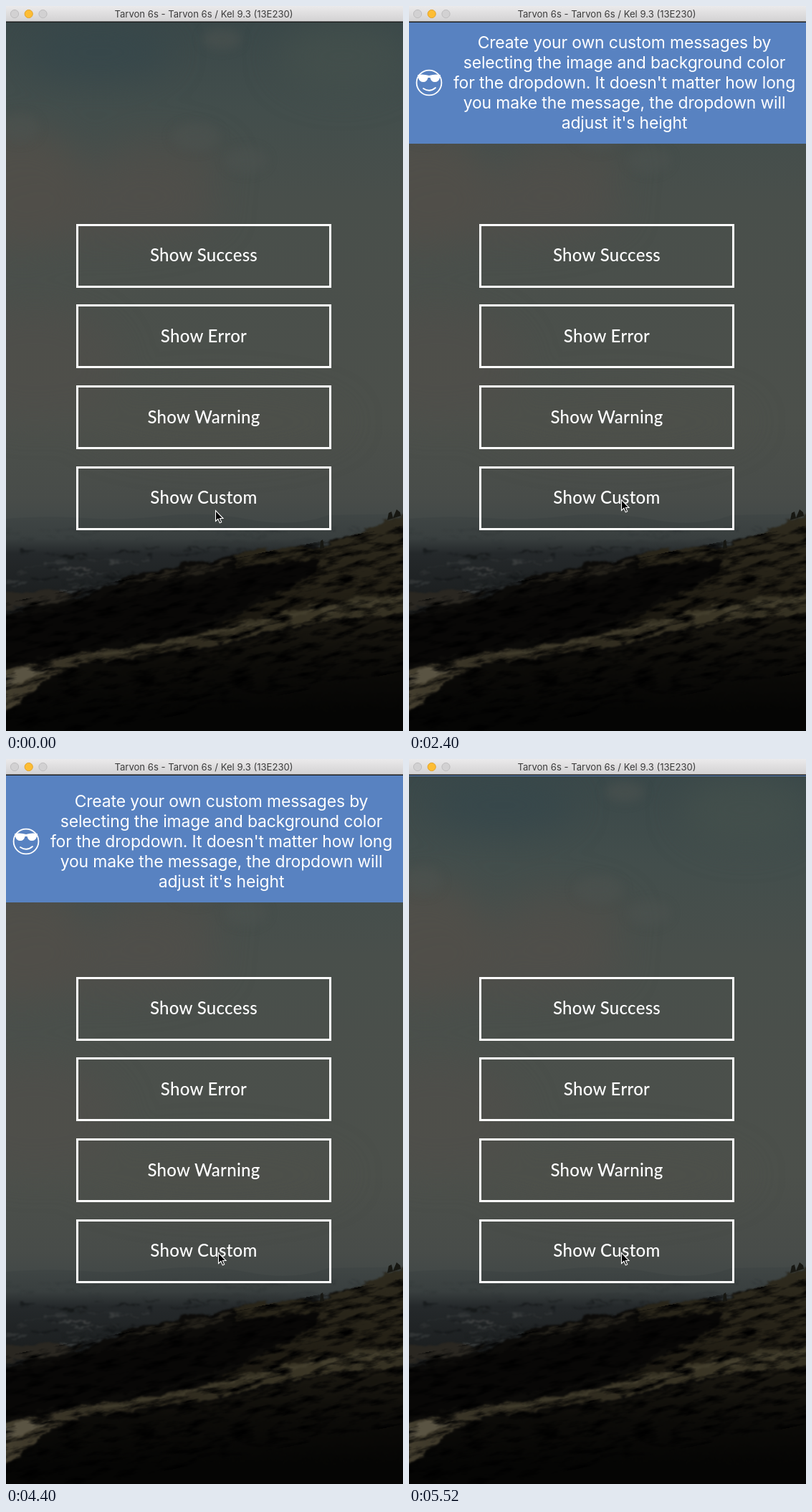
These frames come from a looping animation (554 px wide and 1011 px high, 5600 ms). An HTML page:

```html
<!DOCTYPE html>
<html lang="en">
<head>
<meta charset="utf-8">
<title>Dropdown alert</title>
<style>
  html, body { margin: 0; width: 100%; height: 100%; overflow: hidden; background: #050504; }
  svg { display: block; width: 100%; height: 100%; }
  text { text-anchor: middle; }
  filter { color-interpolation-filters: sRGB; }
  .label { font: 500 24px Lato, "Open Sans", sans-serif; letter-spacing: .3px; fill: #fff; }
  .message { font: 22.9px Inter, Roboto, sans-serif; letter-spacing: -.13px; fill: #fff; }
  .title { font: 13.1px Inter, Roboto, sans-serif; fill: #3c3c3c; }
</style>
</head>
<body>
<svg viewBox="0 0 554 1011">
  <defs>
    <linearGradient id="sky" x2="0" y2="1">
      <stop offset="0" stop-color="#3a4849"/>
      <stop offset=".18" stop-color="#434e4c"/>
      <stop offset=".36" stop-color="#494f4b"/>
      <stop offset=".8" stop-color="#4c504b"/>
      <stop offset=".95" stop-color="#484c49"/>
      <stop offset="1" stop-color="#424847"/>
    </linearGradient>
    <linearGradient id="plain" x2="0" y2="1">
      <stop offset="0" stop-color="#404645"/>
      <stop offset=".2" stop-color="#393f3f"/>
      <stop offset=".32" stop-color="#25292b"/>
      <stop offset=".65" stop-color="#1c1f20"/>
      <stop offset="1" stop-color="#151412"/>
    </linearGradient>
    <linearGradient id="slope" x2="0" y2="1">
      <stop offset="0" stop-color="#302c1f"/>
      <stop offset=".6" stop-color="#262217"/>
      <stop offset="1" stop-color="#18150e"/>
    </linearGradient>
    <linearGradient id="ridge" x1="0" x2="1">
      <stop offset="0" stop-color="#464030"/>
      <stop offset=".35" stop-color="#2b271c"/>
      <stop offset=".75" stop-color="#3b3626"/>
      <stop offset="1" stop-color="#332f21"/>
    </linearGradient>
    <linearGradient id="shade" x2="0" y2="1">
      <stop offset="0" stop-color="#1d1a12"/>
      <stop offset=".4" stop-color="#0c0b08"/>
      <stop offset=".75" stop-color="#050504"/>
    </linearGradient>
    <linearGradient id="bar" x2="0" y2="1">
      <stop offset="0" stop-color="#ebeaeb"/>
      <stop offset="1" stop-color="#d2d1d2"/>
    </linearGradient>
    <filter id="soft" x="-60%" y="-60%" width="220%" height="220%"><feGaussianBlur stdDeviation="24"/></filter>
    <filter id="blur" x="-30%" y="-30%" width="160%" height="160%"><feGaussianBlur stdDeviation="7"/></filter>
    <filter id="rough" x="-5%" y="-5%" width="110%" height="110%">
      <feTurbulence type="fractalNoise" baseFrequency=".05 .1" numOctaves="3" seed="4"/>
      <feDisplacementMap in="SourceGraphic" scale="14" xChannelSelector="R" yChannelSelector="G"/>
      <feGaussianBlur stdDeviation=".8"/>
    </filter>
    <filter id="mottle" x="0" y="0" width="100%" height="100%">
      <feTurbulence type="fractalNoise" baseFrequency=".03 .11" numOctaves="4" seed="9"/>
      <feColorMatrix values="0 0 0 0 0  0 0 0 0 0  0 0 0 0 0  2.6 0 0 0 -1.1"/>
    </filter>
    <clipPath id="screen"><rect y="23" width="554" height="988"/></clipPath>
  </defs>

  <g clip-path="url(#screen)">
    <rect y="22" width="554" height="700" fill="url(#sky)"/>
    <g filter="url(#soft)" fill="#524f4a">
      <ellipse cx="20" cy="255" rx="95" ry="85" opacity=".9"/>
      <ellipse cx="215" cy="225" rx="90" ry="42" opacity=".6"/>
      <ellipse cx="130" cy="285" rx="170" ry="45" opacity=".7"/>
      <ellipse cx="40" cy="500" rx="120" ry="80" opacity=".5"/>
      <ellipse cx="290" cy="580" rx="190" ry="50" opacity=".3"/>
      <ellipse cx="470" cy="70" rx="90" ry="50" fill="#46524e" opacity=".6"/>
      <ellipse cx="130" cy="65" rx="100" ry="40" fill="#35474b" opacity=".6"/>
    </g>
    <g filter="url(#blur)" fill="#4d5350" opacity=".55">
      <ellipse cx="301" cy="46" rx="28" ry="15"/>
      <ellipse cx="20" cy="170" rx="26" ry="20"/>
      <ellipse cx="265" cy="182" rx="34" ry="20"/>
      <ellipse cx="335" cy="215" rx="30" ry="18"/>
    </g>

    <path fill="url(#plain)" d="M0 715Q60 710 110 714T220 711T340 716T450 710L554 708V880H0Z"/>
    <g filter="url(#rough)">
      <g id="fields"></g>
      <path fill="#2a2721" d="M-20 819Q60 813 108 820L70 836L-20 840Z"/>
      <path fill="#0c0b09" d="M-20 852Q50 832 105 828Q140 802 190 792Q250 776 318 768Q340 754 390 757L445 752L500 730L574 702V1030H-20Z"/>
      <path fill="url(#slope)" d="M320 768Q345 753 390 757L440 755Q475 742 500 730L574 702V822Q430 832 290 868Q340 836 400 810Q440 790 436 774Q380 776 320 782Z"/>
      <path fill="#24211a" d="M150 810Q230 782 320 773Q290 791 230 798Q180 805 150 810Z"/>
      <path fill="#080706" d="M-20 866Q70 836 150 826Q260 812 340 784Q400 772 439 774Q435 796 370 819Q300 852 240 870Q120 894 -20 924Z"/>
      <path fill="url(#ridge)" d="M-20 931Q60 911 130 899Q230 886 310 864Q420 833 574 814V846Q430 855 340 880Q240 904 130 913Q70 923 42 951Q22 973 -20 996Z"/>
      <path fill="#5a5443" d="M-20 936Q30 922 62 922Q49 935 30 941Q10 949 -20 955Z"/>
      <path fill="none" stroke="#4c4634" stroke-width="4" opacity=".6" d="M120 906Q230 891 310 870Q420 840 574 824"/>
      <path fill="url(#shade)" d="M-20 998Q30 972 50 946Q80 922 150 914Q260 906 350 882Q440 858 574 845V1030H-20Z"/>
    </g>
    <rect x="-120" y="780" width="760" height="200" transform="rotate(-11 277 880)" filter="url(#mottle)"/>
    <path fill="#171712" d="M438 757L439 746L442 744L444 756ZM532 717L534 707L538 705L540 714L545 702L550 706L551 711Z"/>
    <g id="buttons"></g>

    <g id="banner">
      <rect y="-300" width="554" height="300" fill="#5882c1"/>
      <g id="message"></g>
      <g transform="translate(28 -85)" fill="none" stroke="#fff" stroke-width="1.8">
        <circle r="17.4"/>
        <path d="M-8 8Q1 14 9 7" stroke-linecap="round"/>
        <path fill="#fff" stroke="none" d="M-16-11Q-8-12.500 0-10Q8-12.500 16-11L15-7Q13.500-1 8-1Q3-1 1.500-7H-1.500Q-3-1-8-1Q-13.500-1-15-7Z"/>
      </g>
    </g>
    <path id="cursor" d="M0 0V15L3.400 11.800L5.800 17.300L8.200 16.300L5.900 11H10.500Z" fill="#000" stroke="#fff" stroke-width="1.100"/>
  </g>

  <rect width="554" height="22" fill="url(#bar)"/>
  <rect y="21.500" width="554" height="1.500" fill="#191b1b"/>
  <g stroke-width="1">
    <circle cx="12" cy="11" r="5.600" fill="#d2d1d2" stroke="#bebdbe"/>
    <circle cx="31.700" cy="11" r="5.600" fill="#fdbd33" stroke="#e2a32c"/>
    <circle cx="51.500" cy="11" r="5.600" fill="#d2d1d2" stroke="#bebdbe"/>
  </g>
  <text class="title" x="276" y="16">Tarvon 6s - Tarvon 6s / Kel 9.3 (13E230)</text>
</svg>

<script>
const LOOP = 5600, STEP = 80;
const $ = id => document.getElementById(id);

function add(parent, tag, attrs, text = "") {
  const el = document.createElementNS("http://www.w3.org/2000/svg", tag);
  for (const key in attrs) el.setAttribute(key, attrs[key]);
  el.textContent = text;
  parent.append(el);
}

let seed = 7;
const rand = (min, max) => {
  seed = seed * 16807 % 2147483647;
  return min + seed / 2147483647 * (max - min);
};

// Streaks of far fields and woods
for (let i = 0; i < 130; i++) {
  const y = rand(728, 815);
  const light = y > 768 && i % 2;
  add($("fields"), "rect", {
    x: rand(-20, light ? 190 : 480), y, width: rand(8, 45), height: rand(.8, 2.4),
    fill: light ? "#484b4b" : y < 752 ? "#303637" : "#121516", opacity: rand(.3, .8)
  });
}

["Success", "Error", "Warning", "Custom"].forEach((name, i) => {
  const y = 303.6 + i * 112.7;
  add($("buttons"), "rect", {
    x: 99.5, y: Math.round(y) + 1.5, width: 353, height: 86,
    fill: "none", stroke: "#fff", "stroke-width": 3
  });
  add($("buttons"), "text", { class: "label", x: 276, y: y + 52.6 }, "Show " + name);
});

[
  "Create your own custom messages by",
  "selecting the image and background color",
  "for the dropdown. It doesn't matter how long",
  "you make the message, the dropdown will",
  "adjust it's height"
].forEach((line, i) =>
  add($("message"), "text", { class: "message", x: 300.5, y: -133.2 + i * 28.1 }, line));

// Damped spring: bottom edge of the banner, ms after it starts to drop
function drop(ms) {
  const a = Math.max(0, ms) * .0039, damp = .711;
  return 194 - 174 * Math.exp(-damp * a) * (Math.cos(a) + damp * Math.sin(a));
}

function draw(now) {
  const t = Math.floor(now % LOOP / STEP) * STEP;
  // The exit runs the same spring backwards
  const bottom = t < 3400 ? drop(t - 710) : drop(5568 - t);
  $("banner").setAttribute("transform", `translate(0 ${Math.round(bottom)})`);

  const p = Math.min(1, t / 320), ease = p * p * (3 - 2 * p);
  $("cursor").setAttribute("transform", `translate(${292.5 + 4 * ease} ${703.5 - 15 * ease})`);
}

const start = performance.now();
(function tick() {
  draw(performance.now() - start);
  requestAnimationFrame(tick);
})();
</script>
</body>
</html>
```
